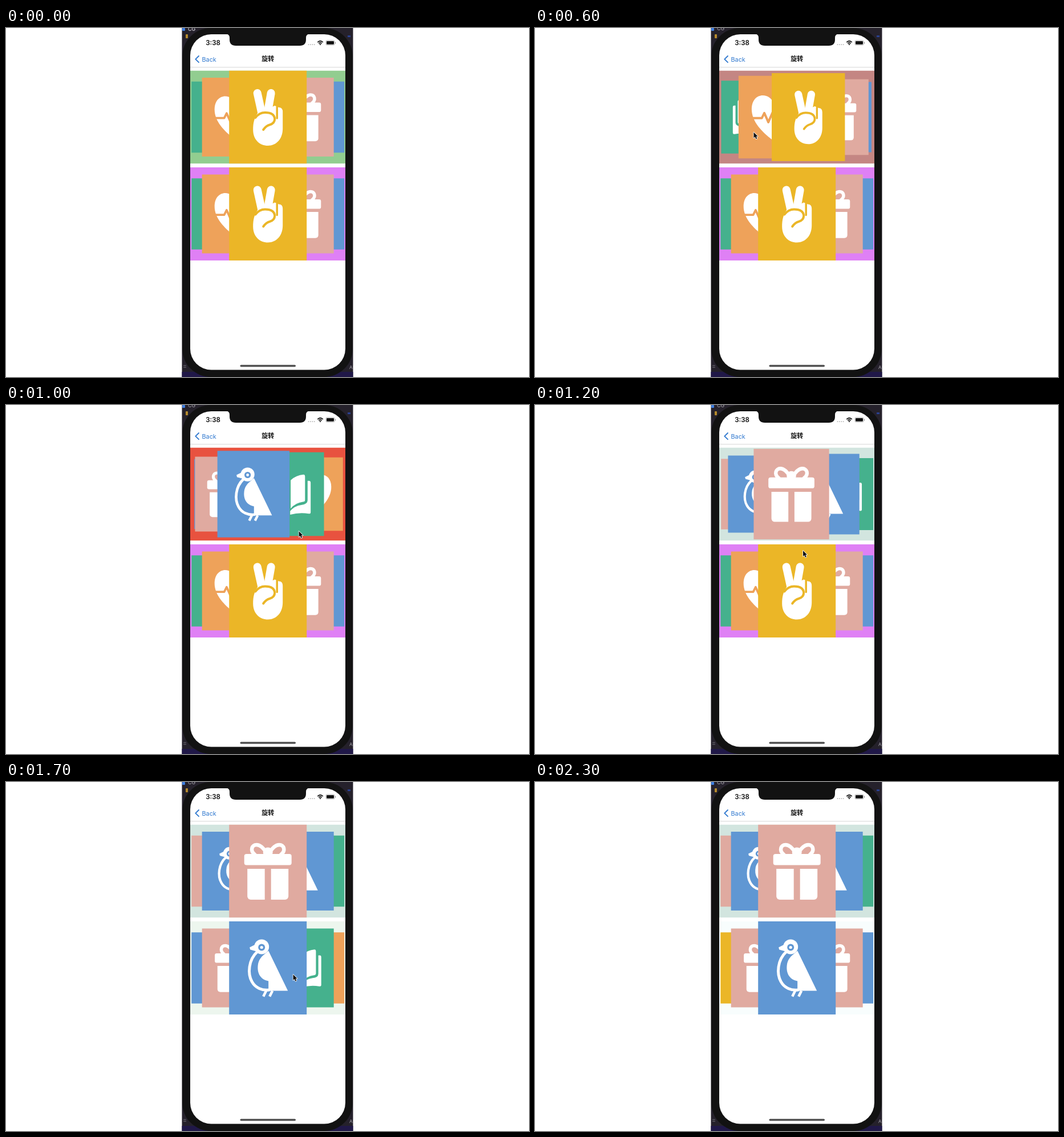
An HTML page with a canvas for the animation above (2400 ms loop, 917x611 px).

```html
<!DOCTYPE html>
<html lang="en">
<head>
<meta charset="utf-8">
<title>Card carousels</title>
<style>
html, body { margin: 0; width: 100%; height: 100%; overflow: hidden; background: #fff; }
canvas { display: block; width: 917px; height: 611px; }
</style>
</head>
<body>
<canvas id="stage" width="917" height="611"></canvas>
<script>
const ctx = document.getElementById('stage').getContext('2d');
const LOOP = 2400, STEP = 100;
const CX = 459.2, CARD_W = 136, CARD_H = 163;
const SANS = 'Inter, "Noto Sans CJK SC", "Noto Sans CJK", sans-serif';
const YELLOW = '#ebb627', PINK = '#e0aaa0', BLUE = '#6097d3', GREEN = '#45b18d', ORANGE = '#eea25a';

function fill(path, color) {
  ctx.fillStyle = color;
  ctx.fill(new Path2D(path));
}
function stroke(path, color, width, cap = 'round') {
  ctx.strokeStyle = color;
  ctx.lineWidth = width;
  ctx.lineCap = cap;
  ctx.lineJoin = 'round';
  ctx.stroke(new Path2D(path));
}
function rect(x, y, w, h, color, r = 0) {
  ctx.fillStyle = color;
  ctx.beginPath();
  ctx.roundRect(x, y, w, h, r);
  ctx.fill();
}
function dot(x, y, r, color) {
  ctx.fillStyle = color;
  ctx.beginPath();
  ctx.arc(x, y, r, 0, 7);
  ctx.fill();
}
function label(str, x, y, font, color, align = 'left') {
  ctx.font = font + ' ' + SANS;
  ctx.fillStyle = color;
  ctx.textAlign = align;
  ctx.fillText(str, x, y);
}
// Draws once as is and once flipped left to right.
function mirrored(draw) {
  draw();
  ctx.save();
  ctx.scale(-1, 1);
  draw();
  ctx.restore();
}

// Icons are drawn around the card centre.
function hand(bg) {
  stroke('M-18.5 -42L-11 -8', '#fff', 14);
  stroke('M5.5 -42L-.5 -8', '#fff', 14);
  fill('M-26 22C-26 40 -14 50 0 50C15 50 26 38 26 20V-9Q26 -17 19 -17L12 -20L-5 -12L-18 -7C-24 2 -26 10 -26 22Z', '#fff');
  stroke('M-8 22Q-3 15 3 13.5Q12 11 12 3Q11 -8 -5 -8Q-15 -8 -22 1', bg, 4);
  stroke('M16 -18V2', bg, 3.5);
}
function gift() {
  rect(-41.5, -30, 83, 19.5, '#fff', 4);
  dot(0, -33, 8.5, '#fff');
  mirrored(() => {
    rect(-36, -4, 30.5, 54, '#fff', [0, 0, 0, 6]);
    stroke('M-23 -29C-32 -36 -28 -46 -20 -46C-12 -46 -7 -38 -2 -32', '#fff', 6.5);
  });
}
function bird(bg) {
  stroke('M-19 -28C-34 -14 -36 10 -28 24C-22 35 -10 40 2 38.5', '#fff', 5);
  fill('M1 -30L35 40H1V23C-14 20 -20 8 -17 -8C-15 -16 -10 -21 -6 -24Z', '#fff');
  fill('M-32 -36L-20 -42V-29L-31 -32Z', '#fff');
  dot(-11, -37, 13, '#fff');
  dot(-11, -36, 6, bg);
  dot(-11, -36, 2.6, '#fff');
  stroke('M-3 40L-8 50M8 40L3 50', '#fff', 4.5, 'butt');
}
function heart(bg) {
  mirrored(() => fill('M0 46C-22 29 -42 9 -42 -16C-42 -33 -32 -43 -20 -43C-10 -43 -3 -37 0 -30Z', '#fff'));
  stroke('M-46 2H-22L-17 -8L-9 10L1 -13L9 2H18', bg, 4.5);
}
function book() {
  mirrored(() => {
    fill('M3 -27Q14 -37 28 -38Q31 -38 31 -34V11Q31 15 27 15Q12 17 3 28Z', '#fff');
    fill('M36 -26H39Q42 -26 42 -22V35Q42 39 38 38Q20 35 2 40V33Q10 23 24 21Q36 20 36 12Z', '#fff');
  });
}

const CARDS = [
  [YELLOW, hand], [PINK, gift], [BLUE, bird], [PINK, gift],
  [BLUE, bird], [GREEN, book], [ORANGE, heart]
];

function carousel(top, pos, color) {
  const n = CARDS.length;
  ctx.save();
  ctx.beginPath();
  ctx.rect(323, top, 272, CARD_H);
  ctx.clip();
  rect(323, top, 272, CARD_H, color);
  CARDS.map(([bg, icon], i) => {
    const raw = i - pos;
    return { bg, icon, d: raw - n * Math.round(raw / n) };
  }).sort((a, b) => Math.abs(b.d) - Math.abs(a.d)).forEach(({ bg, icon, d }) => {
    const far = Math.min(Math.abs(d), 2.6);
    const scale = 1 - 0.19 * far + 0.036 * far * far;
    ctx.save();
    ctx.translate(CX + 82 * Math.sin(d * Math.PI / 4), top + CARD_H / 2);
    ctx.scale(scale, scale);
    rect(-CARD_W / 2, -CARD_H / 2, CARD_W, CARD_H, bg);
    icon(bg);
    ctx.restore();
  });
  ctx.restore();
}

// Tracks: [time, value...], linear in between; colours switch hard.
const TOP_POS = [[0, 0], [100, .12], [300, .74], [400, .9], [600, -.314], [700, -.8], [1000, -2.6], [1200, -3.85], [1300, -4]];
const LOW_POS = [[1200, 0], [1300, .4], [1400, .87], [1500, -.5], [1600, -2.3], [1700, -3], [1900, -3], [2000, -3.8], [2100, -4.6], [2200, -5]];
const POINTER = [[100, 500, 152], [300, 422.5, 156.5], [400, 375, 164], [500, 362, 174], [600, 383.5, 182.5],
  [800, 470, 205], [1000, 513.5, 221], [1200, 470, 255], [1400, 352.5, 283], [1500, 400, 305],
  [1700, 503.5, 337], [1800, 440, 340], [1900, 400, 342], [2100, 505, 350], [2200, 530, 355]];
const TOP_COLOR = [[0, '#92cd90'], [300, '#f3e3af'], [500, '#c48683'], [900, '#e8523f'], [1200, '#d2e5df']];
const LOW_COLOR = [[0, '#df80f5'], [1400, '#454dbb'], [1600, '#edf6ee'], [2000, '#f8fdfd']];

function at(track, t) {
  const i = track.findIndex(k => k[0] > t);
  if (i < 0) return track[track.length - 1].slice(1);
  if (i === 0) return track[0].slice(1);
  const a = track[i - 1], b = track[i];
  const f = (t - a[0]) / (b[0] - a[0]);
  return a.slice(1).map((v, j) => v + (b[j + 1] - v) * f);
}
const held = (track, t) => track.filter(k => k[0] <= t).pop()[1];

function phone(t) {
  // Slivers of the desktop behind the corners
  rect(308.5, 0, 300, 611, '#25212b');
  rect(308.5, 602, 300, 9, '#201848');
  rect(309, 0, 5, 5, '#3d7ee0', 1);
  rect(315, 11, 4, 7, '#b58a2c', 1);
  rect(599, 13, 5, 3, '#29408f');
  label('CG', 319, t ? 3.5 : 4.5, '500 9px', t ? '#9a98a0' : '#d5d3da');
  stroke('M311 591H316M311 594H316', '#77747c', 1, 'butt');
  rect(309, 0, 299, 611, '#121212', 50);
  label('Al', 602, 596.5, '400 8px', '#aaa8b0');
  rect(323, 11, 272, 587.5, '#fff', 37);
  fill('M386 10.5Q392 11 392 17V20Q392 31 403 31H515Q526 31 526 20V17Q526 11 532 10.5Z', '#121212');
}

function bars() {
  label('3:38', 363, 30.2, '600 11.5px', '#111', 'center');
  for (let i = 0; i < 4; i++) dot(530.5 + i * 3.4, 29, 1, '#b9b9b9');
  stroke('M546.2 25Q551 20.5 555.8 25M548.3 27Q551 24.7 553.7 27', '#111', 1.7, 'butt');
  fill('M551 30.3L549.2 28.3Q551 27 552.8 28.3Z', '#111');
  ctx.strokeStyle = '#999';
  ctx.lineWidth = .7;
  ctx.beginPath();
  ctx.roundRect(560.8, 21.8, 15.4, 8.2, 2.3);
  ctx.stroke();
  rect(562, 23, 13, 5.8, '#111', 1.3);
  rect(577, 24.5, 1, 3, '#999', .5);
  stroke('M338 49L332.3 54.6L338 60.2', '#2f78cf', 1.8);
  label('Back', 343.5, 58.6, '400 10.8px', '#2f78cf');
  label('旋转', CX, 58.4, '700 11px', '#111', 'center');
  rect(323, 68.3, 272, 1, '#d6d6d6');
  rect(410.5, 589.8, 97.5, 3.4, '#505050', 1.7);
}

function pointer(x, y) {
  ctx.save();
  ctx.translate(x, y);
  const arrow = 'M0 0V10L2.3 7.9L4 11.7L5.8 10.9L4.2 7.2H7.2Z';
  stroke(arrow, '#fff', 1.6);
  fill(arrow, '#111');
  ctx.restore();
}

function frame(now) {
  const t = Math.floor(now % LOOP / STEP) * STEP;
  ctx.clearRect(0, 0, 917, 611);
  phone(t);
  bars();
  carousel(74.5, at(TOP_POS, t)[0], held(TOP_COLOR, t));
  carousel(244, at(LOW_POS, t)[0], held(LOW_COLOR, t));
  if (t >= 100 && t <= 2200) pointer(...at(POINTER, t));
}

const start = performance.now();
function tick() {
  frame(performance.now() - start);
  requestAnimationFrame(tick);
}
tick();
</script>
</body>
</html>
```
